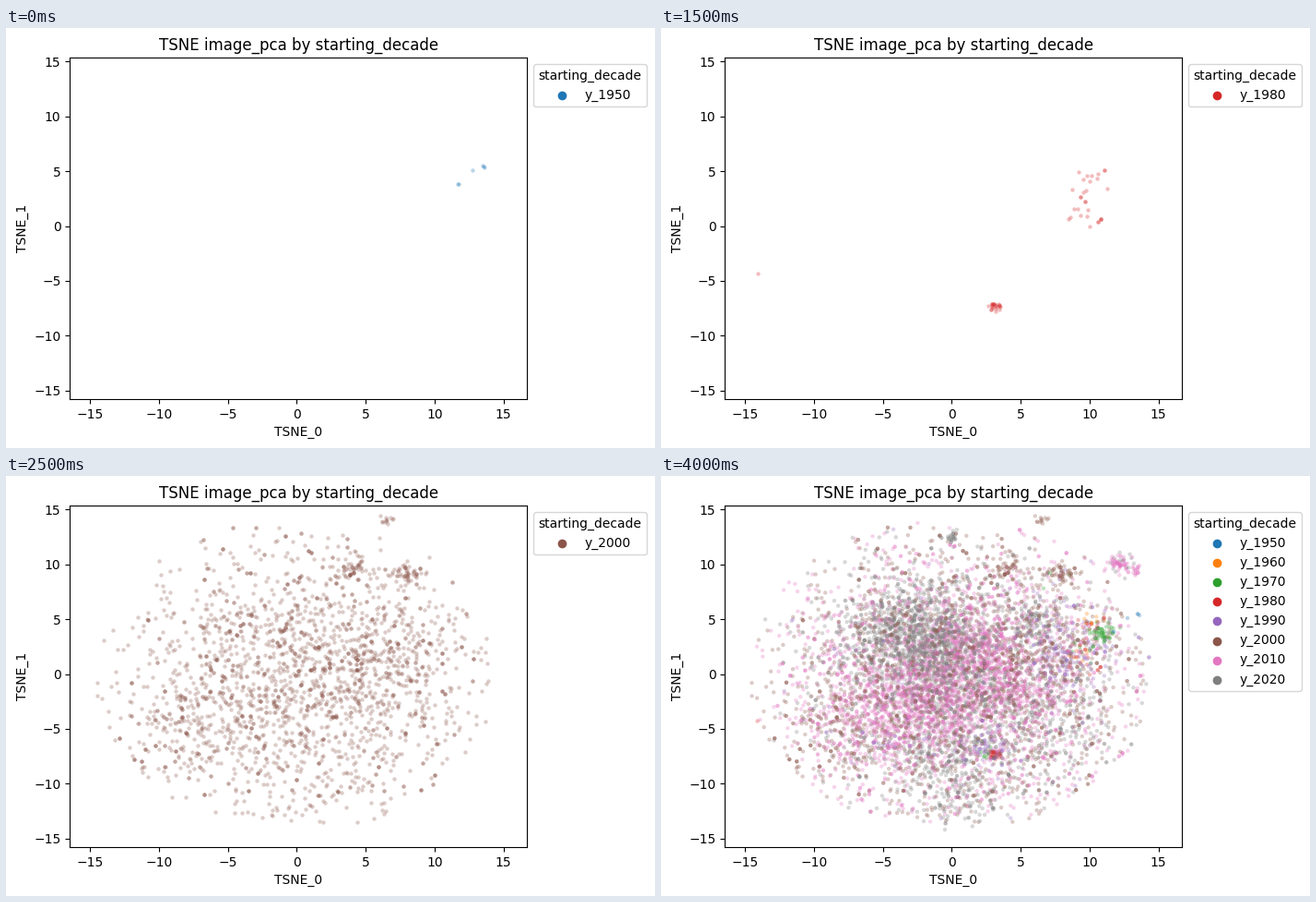
Write a matplotlib script that moves like this. It is 704 by 455 pixels and loops after 5000 ms.

```python
import numpy as np
import matplotlib.pyplot as plt
from matplotlib.animation import FuncAnimation

W, H, DPI = 704, 455, 100
plt.rcParams["font.family"] = "DejaVu Sans"

DECADES = [f"y_{year}" for year in range(1950, 2030, 10)]
COLORS = {d: f"C{i}" for i, d in enumerate(DECADES)}  # default colour cycle
RIM = (14.7, 14.3)  # half axes of the round map

# Each decade is a sum of round clouds: count, centre x, centre y, spread.
CLOUDS = {
    "y_1950": [(3, 13.5, 5.5, .06), (2, 11.7, 3.85, .02), (1, 12.75, 5.1, 0)],
    "y_1960": [(9, 10.4, 4.6, .4), (6, 9.4, 1.8, .4)],
    "y_1970": [(42, 11, 3.9, .5), (10, 9.3, 2, 1.1), (7, 2.7, -7.2, .5), (4, 7.5, 9.3, 1.6)],
    "y_1980": [(1, -14.1, -4.3, 0), (18, 3.1, -7.4, .25), (14, 9.2, 2, 1.1), (10, 10.4, 4.5, .5)],
    "y_1990": [(95, 0, 0, 6.6), (110, 8.7, 1.6, 1.6), (70, 2.6, -6.8, 1), (16, -4.6, -6, .6),
               (50, 7.5, 4, 3)],
    "y_2000": [(1750, .3, -.8, 6.4), (120, -7.5, -4.8, 2.2), (150, 7, 2, 2.4), (40, 4, 9.6, .6),
               (45, 7.9, 9.1, .6), (12, 6.5, 14.2, .3)],
    "y_2010": [(1700, 0, -.8, 6), (300, 2.2, 2.2, 1.7), (400, -1.2, -2.5, 2.1),
               (260, -6, -3.5, 2.4), (150, 5, -1.7, 1.5), (45, 12.1, 10.1, .35),
               (14, 13.2, 9.5, .3)],
    "y_2020": [(850, .3, -.6, 6.3), (950, -2.2, 3.3, 2.5), (220, .8, -1.4, 2.3),
               (110, -1.3, -7.4, 1.5), (90, .5, -11, 1.8), (80, 6, 4.7, .9),
               (120, 7, -5.4, 2.1), (22, .05, 12.5, .25), (14, 12.2, 10.2, .5)],
}


def cloud(rng, n, cx, cy, spread):
    pts = rng.normal((cx, cy), spread, (n, 2))
    if spread > 1:  # wide clouds end at the rim
        pts = pts[np.hypot(*(pts / RIM).T) < 1]
    # Some points are stacked and look darker.
    return np.repeat(pts, rng.choice([1, 2, 3], len(pts), p=[.85, .11, .04]), axis=0)


def decade_points(seed, name):
    rng = np.random.default_rng(seed)
    return np.vstack([cloud(rng, *spec) for spec in CLOUDS[name]])


POINTS = {d: decade_points(i + 3, d) for i, d in enumerate(DECADES)}
ALL = np.vstack([POINTS[d] for d in DECADES])
ALL_COLORS = np.repeat([COLORS[d] for d in DECADES], [len(POINTS[d]) for d in DECADES])
order = np.random.default_rng(11).permutation(len(ALL))
ALL, ALL_COLORS = ALL[order], ALL_COLORS[order]

fig = plt.figure(figsize=(W / DPI, H / DPI), dpi=DPI, facecolor="white")
ax = fig.add_axes([69.2 / W, 53.2 / H, 496 / W, 369.6 / H])
ax.set_xlim(-16.47, 16.71)
ax.set_ylim(-15.78, 15.36)
ax.set_title("TSNE image_pca by starting_decade")
ax.set_xlabel("TSNE_0")
ax.set_ylabel("TSNE_1")

dots = ax.scatter([], [], s=10, linewidths=0, alpha=.3)
keys = {d: ax.scatter([], [], color=c, label=d) for d, c in COLORS.items()}


def update(i):
    if i < len(DECADES):
        shown = [DECADES[i]]
        pts, colors = POINTS[shown[0]], COLORS[shown[0]]
    else:
        shown, pts, colors = DECADES, ALL, ALL_COLORS
    dots.set_offsets(pts)
    dots.set_facecolor(colors)
    ax.legend(handles=[keys[d] for d in shown], title="starting_decade",
              loc="upper left", bbox_to_anchor=(1, 1))
    return [dots]


anim = FuncAnimation(fig, update, frames=10, interval=500, init_func=lambda: [dots],
                     repeat=True, repeat_delay=0, blit=False)
plt.show()
```
